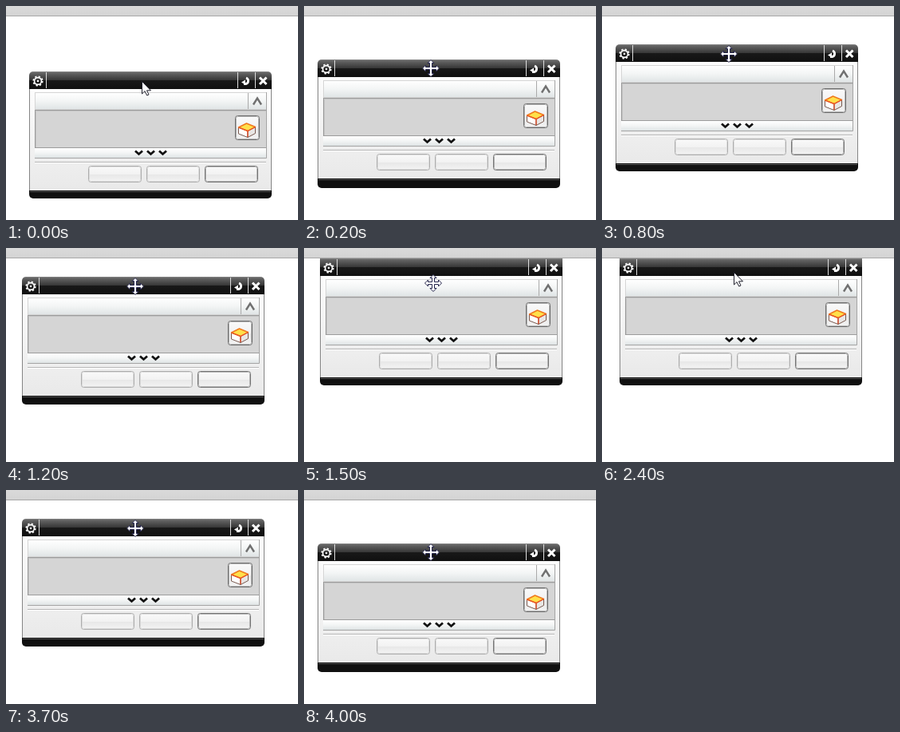
An HTML page that plays this animation: 366 by 268 pixels, repeating every 4.3 s.

```html
<!DOCTYPE html>
<html lang="en">
<head>
<meta charset="utf-8">
<title>Dialog docking</title>
<style>
  html, body { margin: 0; width: 100%; height: 100%; overflow: hidden; background: #fff; }
  svg { display: block; }
</style>
</head>
<body>
<svg width="366" height="268" viewBox="0 0 366 268">
  <defs>
    <linearGradient id="title" gradientUnits="userSpaceOnUse" x1="0" y1="0" x2="0" y2="22">
      <stop offset="0" stop-color="#8a8a8a"/>
      <stop offset=".08" stop-color="#646464"/>
      <stop offset=".48" stop-color="#383838"/>
      <stop offset=".52" stop-color="#181818"/>
      <stop offset="1" stop-color="#101010"/>
    </linearGradient>
    <linearGradient id="body" x2="0" y2="1">
      <stop offset="0" stop-color="#fcfcfc"/>
      <stop offset="1" stop-color="#e9e9e9"/>
    </linearGradient>
    <linearGradient id="header" x2="0" y2="1">
      <stop offset="0" stop-color="#fff"/>
      <stop offset=".5" stop-color="#f3f5f5"/>
      <stop offset="1" stop-color="#dfe4e5"/>
    </linearGradient>
    <linearGradient id="button" x2="0" y2="1">
      <stop offset="0" stop-color="#fafafa"/>
      <stop offset=".5" stop-color="#f2f2f2"/>
      <stop offset=".55" stop-color="#e8e8e8"/>
      <stop offset="1" stop-color="#f4f4f4"/>
    </linearGradient>
    <linearGradient id="bar" x2="0" y2="1">
      <stop offset="0" stop-color="#dadada"/>
      <stop offset="1" stop-color="#d4d4d4"/>
    </linearGradient>
    <path id="chevron" d="M-4.5-2.5L0 1.5L4.5-2.5" fill="none" stroke-width="2.8"/>
  </defs>

  <g id="dialog">
    <rect id="shell" width="304" rx="5" fill="url(#title)"/>
    <path d="M1 150.5H303" stroke="#505050"/>
    <rect y="22" width="304" height="127" fill="url(#body)"/>
    <path d="M.5 22V149M303.5 22V149" stroke="#858585"/>
    <path d="M21.5 1V21M261.5 1V21M283.5 1V21" stroke="#ddd"/>

    <!-- title icons -->
    <g fill="none" stroke="#fff">
      <circle cx="11" cy="12" r="4.4" stroke-width="1.6"/>
      <circle cx="11" cy="12" r="5.8" stroke-width="1.6" stroke-dasharray="2.28 2.28"/>
      <path d="M272 8A4 4 0 0 1 272 15.5H269" stroke-width="2.8"/>
      <path d="M289 7.5L297.5 16M297.5 7.5L289 16" stroke-width="3"/>
    </g>
    <circle cx="11" cy="12" r="1.3" fill="#fff"/>
    <path d="M266 13.5L271 10.5V16.5Z" fill="#fff"/>

    <!-- group -->
    <rect x="7.5" y="26.5" width="290" height="21" fill="url(#header)" stroke="#d5d5d5"/>
    <path d="M274.5 27V47" stroke="#aaa"/>
    <path d="M281 41.5L286 33.5L291 41.5" fill="none" stroke="#707070" stroke-width="2.4"/>
    <rect x="7.5" y="48.5" width="290" height="47" fill="#d5d5d5" stroke="#9c9c9c"/>
    <path d="M8.5 95V49.5H297" fill="none" stroke="#c3c3c3"/>
    <rect x="7" y="96" width="291" height="12" fill="url(#header)"/>
    <path d="M7 108.5H297.5V26" fill="none" stroke="#a5a5a5"/>
    <g stroke="#111">
      <use href="#chevron" x="137.5" y="102"/>
      <use href="#chevron" x="152.5" y="102"/>
      <use href="#chevron" x="167.5" y="102"/>
    </g>
    <path d="M7 113.5H297" stroke="#b5b5b5"/>
    <path d="M7 114.5H297" stroke="#fff"/>

    <!-- cube button -->
    <rect x="258.5" y="55.5" width="30" height="30" rx="3" fill="url(#button)" stroke="#6c6c6c"/>
    <rect x="259.5" y="56.5" width="28" height="28" rx="2" fill="none" stroke="#b4b4b4"/>
    <g transform="translate(273 73)" stroke-linejoin="round">
      <path d="M-10.5-3L1 1.5V9.5L-10.5 5Z" fill="#fff" stroke="#7a5a50"/>
      <path d="M1 1.5L10.5-3.5V4.5L1 9.5Z" fill="#e8e6e4" stroke="#7a5a50"/>
      <path d="M-10.5-3L-.5-8L10.5-3.5L1 1.5Z" fill="#ffe04a" stroke="#f0781c" stroke-width="1.4"/>
      <path d="M-10.5-3L1 1.5L10.5-3.5M1 1.5V9" fill="none" stroke="#e8502a" stroke-width="1.3"/>
    </g>

    <!-- footer buttons -->
    <g fill="url(#button)" stroke="#adadad">
      <rect x="74.5" y="118.5" width="66" height="20" rx="3"/>
      <rect x="147.5" y="118.5" width="66" height="20" rx="3"/>
      <rect x="220.5" y="118.5" width="66" height="20" rx="3" stroke="#757575"/>
    </g>
    <g fill="none" stroke="#dcdcdc">
      <rect x="75.5" y="119.5" width="64" height="18" rx="2"/>
      <rect x="148.5" y="119.5" width="64" height="18" rx="2"/>
      <rect x="221.5" y="119.5" width="64" height="18" rx="2" stroke="#b4b4b4"/>
    </g>
  </g>

  <rect width="366" height="12" fill="url(#bar)"/>
  <path d="M0 12.5H366" stroke="#a8a8a8"/>

  <path id="arrow" d="M.5.5V16L4 12.6L6.7 18L9 17L6.5 11.8H11.5Z" fill="#fff" stroke="#23232f"/>
  <path id="move" fill="#fff" stroke="#23234a"
    d="M0-10.5L4-6.5H1.5V-1.5H6.5V-4L10.5 0L6.5 4V1.5H1.5V6.5H4L0 10.5L-4 6.5H-1.5V1.5H-6.5V4L-10.5 0L-6.5-4V-1.5H-1.5V-6.5H-4Z"/>
</svg>

<script>
const LOOP = 4300;
const DOCK_Y = 13;

// start time, dialog x and y, cursor kind and position, extra height of the shell
const steps = [
  [0, 29, 82, "arrow", 170, 94, 0],
  [200, 17, 67, "move", 159, 78, 2],
  [500, 17, 56, "move", 159, 68, 0],
  [800, 17, 48, "move", 159, 60, 0],
  [1100, 18, 42, "move", 160, 54, 0],
  [1200, 20, 36, "move", 162, 48, 1],
  [1500, 20, DOCK_Y, "move", 162, 44, 0],
  [2400, 22, DOCK_Y, "arrow", 165, 30, 0],
  [3300, 20, DOCK_Y, "move", 162, 44, 0],
  [3700, 20, 36, "move", 162, 48, 1],
  [4000, 17, 67, "move", 159, 78, 2],
];

const byId = id => document.getElementById(id);
const place = (el, x, y) => el.setAttribute("transform", `translate(${x} ${y})`);

function draw(now) {
  const t = now % LOOP;
  const [, x, y, kind, cx, cy, extra] = steps.findLast(step => step[0] <= t);
  // a docked dialog hides its rounded top behind the toolbar
  const tuck = y === DOCK_Y ? 6 : 0;
  place(byId("dialog"), x, y);
  byId("shell").setAttribute("y", -tuck);
  byId("shell").setAttribute("height", 159 + tuck + extra);
  for (const id of ["arrow", "move"]) {
    byId(id).style.display = id === kind ? "" : "none";
    place(byId(id), cx, cy);
  }
}

const start = performance.now();
function tick() {
  draw(performance.now() - start);
  requestAnimationFrame(tick);
}
tick();
</script>
</body>
</html>
```
